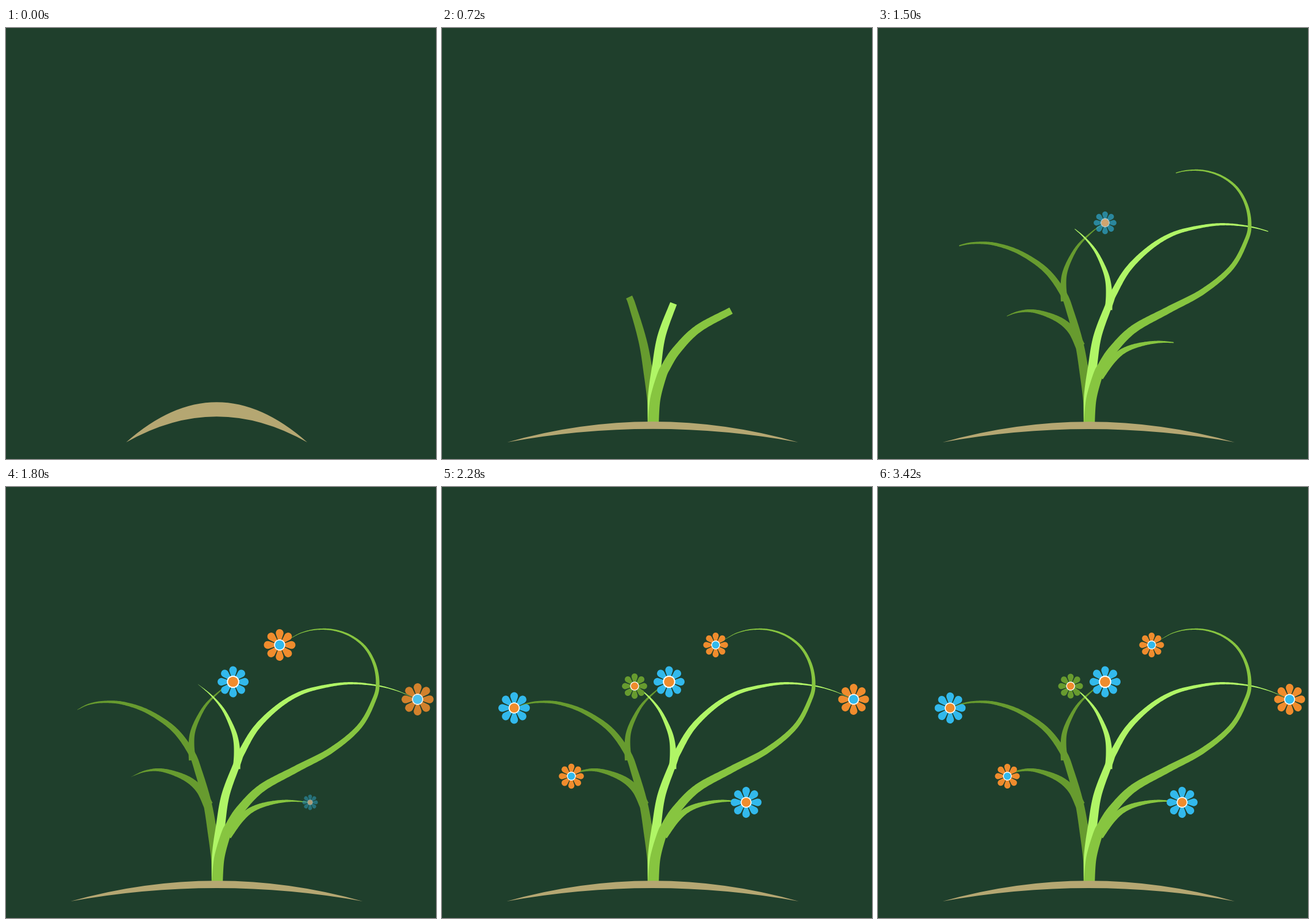
Recreate the animation shown at these times as an HTML page with a canvas. Size 748 px wide and 749 px high, loop 3480 ms.

```html
<!DOCTYPE html>
<html lang="en">
<head>
<meta charset="utf-8">
<title>Growing flowers</title>
<style>
html, body { margin: 0; width: 100%; height: 100%; overflow: hidden; background: #1f3f2c; }
canvas { display: block; }
</style>
</head>
<body>
<canvas id="stage" width="748" height="749"></canvas>
<script>
const ctx = document.getElementById('stage').getContext('2d');
const LOOP = 3480, STEP = 60;
const BG = '#1f3f2c', SOIL = '#b5a772';
const DARK = '#679b2f', LIME = '#b0f566', LEAF = '#87c540';
const BLUE = '#32b9ec', ORANGE = '#f08c2d';

const clamp = v => Math.max(0, Math.min(1, v));
const cubicOut = u => 1 - (1 - clamp(u)) ** 3;
const elastic = u => u <= 0 ? 0 : u >= 1 ? 1 : 1 - 2 ** (-10 * u) * Math.cos(5 * Math.PI * u);

// Each stem: colour, start, duration, base width, taper power, points along the middle
const stems = [
  [DARK, 880, 1000, 12, 1, '324,475 322.5,448 325,425 335,400 350,376 374,353 395,338'],
  [DARK, 863, 1000, 17, 1, '352,553 338,527 318,509 291,497 265,491.5 240,494.5 217,504'],
  [DARK, 372, 1775, 19, .75, '367,688 366,650 359,600 350,548 335,495 322,461 292,421 248,391 205,376 170,373.5 143,378 121,389'],
  [LIME, 909, 1000, 13, 1, '401,490 402,465 400,440 393,417 378,387 357,362 333,342'],
  [LIME, 480, 1725, 19, 1, '367.5,688 367,640 373,590 382,535 403,478 410,461 435,419 473,382 513,358 557,346 600,341 645,345 680,354 716,369'],
  [LEAF, 946, 1000, 15, .95, '385,606 406,579 427,561 455,550.5 490,545.5 529,548'],
  [LEAF, 480, 1725, 19, 1, '367.5,688 371,645 382,605 390,588 408,560 445,523 505,490 565,458 615,416 641,368 646.5,340 641,308 625,279 600,259 570,248.5 540,247.5 515,253 497,262 476,275']
].map(([color, start, dur, width, power, pts]) =>
  ({ color, start, dur, ...outline(pts, width, power) }));

// Each flower: x, y, radius, petals, centre, ring size, start
const flowers = [
  [395, 338.5, 27, BLUE, ORANGE, .4, 1450],
  [476, 274.5, 21.6, ORANGE, BLUE, .355, 1675],
  [716, 369, 27, ORANGE, BLUE, .355, 1727],
  [529, 548, 27, BLUE, ORANGE, .355, 1765],
  [225, 502.5, 21.6, ORANGE, BLUE, .355, 1835],
  [125.5, 384, 27, BLUE, ORANGE, .355, 1865],
  [335, 346, 21.6, DARK, ORANGE, .355, 1865]
];

function spline(a, b, c, d, t) {
  return .5 * (2 * b + (c - a) * t + (2 * a - 5 * b + 4 * c - d) * t * t +
    (3 * b - a - 3 * c + d) * t ** 3);
}

// Smooth middle line with a left and a right edge at every sample
function outline(text, width, power) {
  const p = text.split(' ').map(s => s.split(',').map(Number));
  const at = i => p[Math.max(0, Math.min(p.length - 1, i))];
  const mid = [];
  const n = 20;
  for (let k = 0; k <= (p.length - 1) * n; k++) {
    const i = Math.min(Math.floor(k / n), p.length - 2), t = k / n - i;
    mid.push([0, 1].map(j => spline(at(i - 1)[j], at(i)[j], at(i + 1)[j], at(i + 2)[j], t)));
  }
  let length = 0;
  const dist = mid.map((q, i) =>
    length += i ? Math.hypot(q[0] - mid[i - 1][0], q[1] - mid[i - 1][1]) : 0);
  const edges = mid.map(([x, y], i) => {
    const a = mid[Math.max(0, i - 1)], b = mid[Math.min(mid.length - 1, i + 1)];
    const dx = b[0] - a[0], dy = b[1] - a[1];
    const k = width / 2 * (1 - dist[i] / length) ** power / Math.hypot(dx, dy);
    return [x + dy * k, y - dx * k, x - dy * k, y + dx * k];
  });
  return { dist, edges, length };
}

function drawStem(s, time) {
  const reach = s.length * cubicOut((time - s.start) / s.dur);
  if (reach <= 0) return;
  let end = s.dist.findIndex(d => d >= reach);
  if (end < 0) end = s.dist.length - 1;
  const f = (reach - s.dist[end - 1]) / (s.dist[end] - s.dist[end - 1]);
  const last = s.edges[end - 1].map((v, j) => v + (s.edges[end][j] - v) * f);
  const shape = [...s.edges.slice(0, end), last];
  ctx.fillStyle = s.color;
  ctx.beginPath();
  shape.forEach(e => ctx.lineTo(e[0], e[1]));
  shape.reverse().forEach(e => ctx.lineTo(e[2], e[3]));
  ctx.fill();
}

function disc(r, color) {
  ctx.fillStyle = color;
  ctx.beginPath();
  ctx.arc(0, 0, r, 0, 2 * Math.PI);
  ctx.fill();
}

function drawFlower([x, y, r, petals, centre, ring, start], time) {
  const age = time - start;
  if (age <= 0) return;
  const scale = r * elastic(age / 700);
  ctx.save();
  ctx.translate(x, y);
  ctx.scale(scale, scale);
  ctx.globalAlpha = clamp(age / 85);
  ctx.fillStyle = petals;
  ctx.beginPath();
  for (let i = 0; i < 8; i++) {
    const a = i * Math.PI / 4;
    ctx.moveTo(0, 0);
    ctx.arc(.755 * Math.cos(a), .755 * Math.sin(a), .245, a - 1.9, a + 1.9);
    ctx.closePath();
  }
  ctx.fill();
  disc(ring, '#fff');
  disc(ring * .82, centre);
  ctx.restore();
}

function drawGround(time) {
  const e = elastic((time + 10) / 1500);
  ctx.save();
  ctx.translate(366.5, 720);
  ctx.scale(.6 + .4 * e, 2 - e);
  ctx.fillStyle = SOIL;
  ctx.beginPath();
  ctx.moveTo(-254, 0);
  ctx.quadraticCurveTo(0, -71.5, 254, 0);
  ctx.quadraticCurveTo(0, -46, -254, 0);
  ctx.fill();
  ctx.restore();
}

function draw(time) {
  ctx.fillStyle = BG;
  ctx.fillRect(0, 0, 748, 749);
  stems.forEach(s => drawStem(s, time));
  drawGround(time);
  flowers.forEach(f => drawFlower(f, time));
}

const began = performance.now();
function tick() {
  const time = (performance.now() - began) % LOOP;
  draw(Math.floor(time / STEP) * STEP);
  requestAnimationFrame(tick);
}
tick();
</script>
</body>
</html>
```
